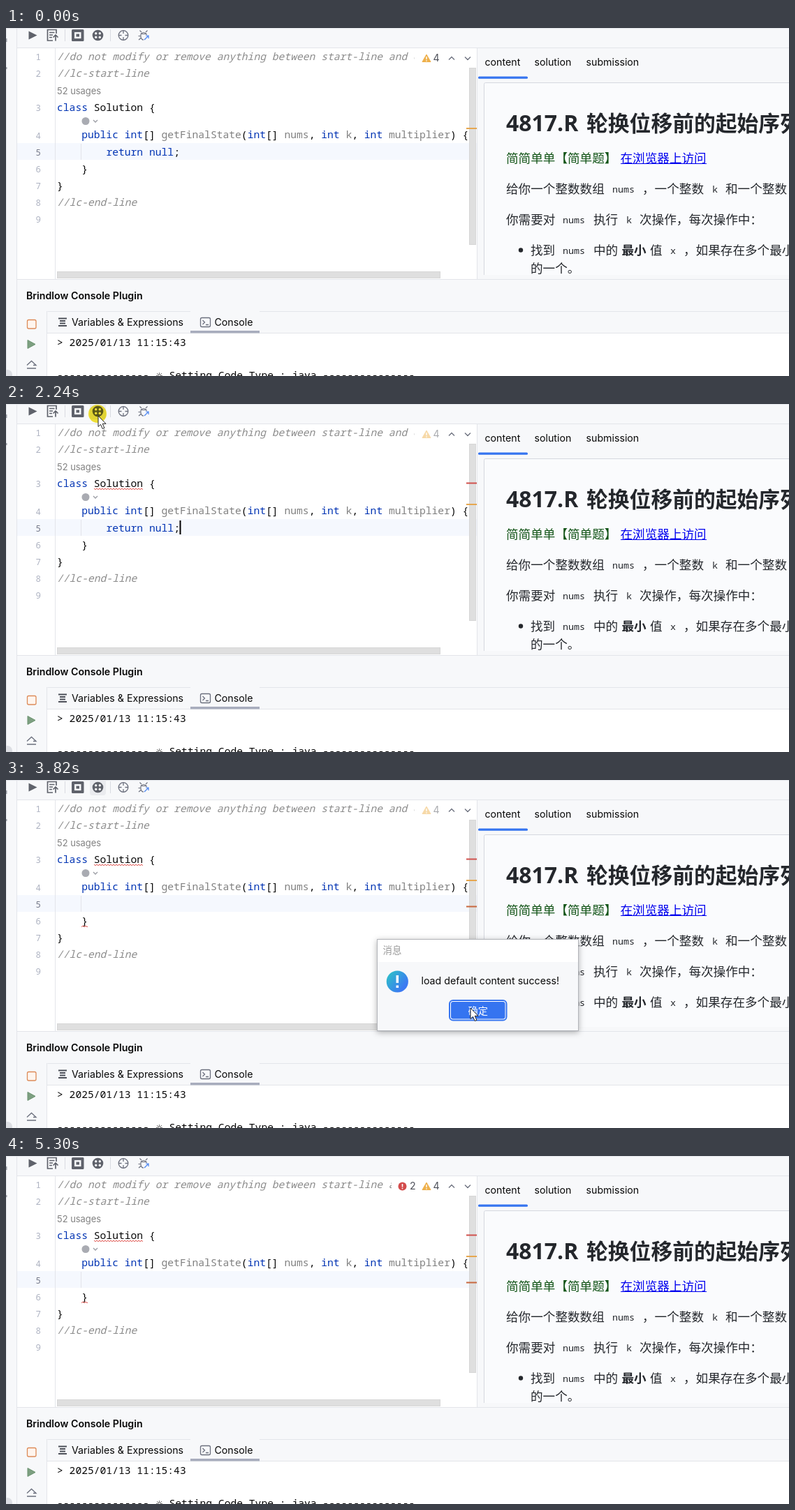
These frames come from a looping animation (1121 px wide and 499 px high, 5.37 s). An HTML page:

```html
<!DOCTYPE html>
<html lang="zh-CN">
<head>
<meta charset="utf-8">
<title>Editor</title>
<style>
html, body { margin: 0; width: 100%; height: 100%; overflow: hidden; background: #f7f8fa; }
svg { display: block; width: 1121px; height: 499px; }
text { white-space: pre; }
.ui { font: 14.2px Inter, sans-serif; fill: #080808; }
.mono { font: 14.67px "Noto Sans Mono", "DejaVu Sans Mono", monospace; fill: #080808; }
.num { font-size: 12.4px; fill: #aeb3c2; text-anchor: end; }
.comment { font-style: italic; fill: #8c8c8c; }
.kw { fill: #0033b3; }
.dim { fill: #808080; }
.doc { font: 17.6px "Noto Sans CJK SC", "Noto Sans CJK", sans-serif; fill: #24272c; }
.doc .v { font: 13.4px "Noto Sans Mono", monospace; }
.line { fill: none; stroke: #6c707e; stroke-width: 1.3; }
.edge { fill: none; stroke: #e3e5ea; }
.bar { fill: #dfdfdf; stroke: #d6d6d6; }

/* Every part shares one 5370 ms timeline. */
.t { animation: 5370ms step-end infinite; }
.cursor { animation-name: move; }
.pointer { animation-name: present; }
.hover { animation-name: hover; }
.tip { animation-name: tip; }
.click { fill: #f5e536; mix-blend-mode: multiply; }
.click1 { animation-name: click1; }
.click2 { animation-name: click2; }
.error1 { animation-name: error1; }
.error2 { animation-name: error2; }
.count { animation-name: count; }
.analysis { animation-name: analysis; }
.body { animation-name: body; }
.caret1 { animation-name: caret1; }
.caret2 { animation-name: caret2; }
.dialog { animation-name: dialog; transform-origin: 675.5px 293.5px; }
.active { animation-name: active; }
.inactive { animation-name: inactive; }

@keyframes move {
  0% { transform: translate(1057px, 485px); }
  3.72% { transform: translate(1057px, 485px); animation-timing-function: steps(4, start); }
  8.93% { transform: translate(457px, 245px); animation-timing-function: steps(4, start); }
  13.77% { transform: translate(73px, 94px); animation-timing-function: steps(5, start); }
  20.29% { transform: translate(142px, 23px); }
  21.6% { transform: translate(142px, 23px); animation-timing-function: steps(3, start); }
  25.13% { transform: translate(134px, 16px); }
  31.47% { transform: translate(132px, 17px); }
  46.74% { transform: translate(132px, 17px); animation-timing-function: steps(7, start); }
  55.86% { transform: translate(648px, 336px); animation-timing-function: steps(1, start); }
  57.16% { transform: translate(663px, 346px); animation-timing-function: steps(3, start); }
  61.07% { transform: translate(684px, 345px); animation-timing-function: steps(3, start); }
  64.98% { transform: translate(665px, 327px); }
  78.39% { transform: translate(665px, 327px); animation-timing-function: steps(4, start); }
  83.42%, 100% { transform: translate(918px, 485px); }
}
@keyframes present { 0%, 83.42%, 100% { opacity: 0; } 3.72% { opacity: 1; } }
@keyframes hover { 0%, 72.25%, 100% { opacity: 0; } 22.9% { opacity: 1; } }
@keyframes tip { 0%, 41.71%, 100% { opacity: 0; } 31.47% { opacity: .6; } 32.77% { opacity: 1; } }
@keyframes click1 { 0%, 43.01%, 100% { opacity: 0; } 41.71% { opacity: 1; } }
@keyframes click2 { 0%, 71.13%, 100% { opacity: 0; } 69.83% { opacity: 1; } }
@keyframes error1 { 0% { opacity: 0; } 6.33%, 100% { opacity: 1; } }
@keyframes error2 { 0% { opacity: 0; } 71.13%, 100% { opacity: 1; } }
@keyframes count { 0% { opacity: 0; } 81%, 100% { opacity: 1; } }
@keyframes analysis { 0%, 81%, 100% { opacity: 1; } 6.33% { opacity: .48; } }
@keyframes body { 0% { opacity: 1; } 46.74%, 100% { opacity: 0; } }
@keyframes caret1 { 0%, 46.74%, 100% { opacity: 0; } 41.71% { opacity: 1; } }
@keyframes caret2 { 0%, 82.12%, 98.69%, 100% { opacity: 0; } 73.37%, 90.87% { opacity: 1; } }
@keyframes dialog {
  0%, 74.67%, 100% { opacity: 0; transform: scale(.95); }
  51.95% { opacity: .35; transform: scale(.96); }
  53.25% { opacity: .75; transform: scale(.99); }
  54.56% { opacity: .95; transform: none; }
  55.86% { opacity: 1; transform: none; }
  72.25% { opacity: .55; transform: scale(.985); }
  73.37% { opacity: .14; transform: translate(-.5px, -1px) scale(.963); }
}
@keyframes active { 0% { opacity: 1; } 71.13%, 100% { opacity: 0; } }
@keyframes inactive { 0% { opacity: 0; } 71.13%, 100% { opacity: 1; } }
</style>
</head>
<body>
<svg viewBox="0 0 1121 499">
  <defs>
    <pattern id="wave" width="4" height="4" patternUnits="userSpaceOnUse">
      <path d="M-1 3.5L2 1L5 3.5" fill="none" stroke="#dc4a45"/>
    </pattern>
    <linearGradient id="info" x2="1" y2=".8">
      <stop offset=".1" stop-color="#2dbfca"/><stop offset=".85" stop-color="#3c7af2"/>
    </linearGradient>
    <filter id="shadow" x="-10%" y="-15%" width="120%" height="130%">
      <feDropShadow dx="0" dy="2" stdDeviation="4" flood-opacity=".3"/>
    </filter>
    <clipPath id="page"><rect x="685" y="80" width="436" height="274"/></clipPath>
  </defs>

  <!-- Window frame -->
  <rect width="1121" height="499" fill="#f7f8fa"/>
  <path class="edge" d="M0 .5H1121M15.5 0V499M15 28.5H1121M.5 0V499"/>
  <path d="M0 15v5M0 56v3" stroke="#9a9da6" stroke-width="3"/>
  <circle cx="2" cy="497" r="7" fill="#dcdee3"/>

  <!-- Toolbar -->
  <rect class="t hover" x="120" y="-3" width="23" height="25" rx="4" fill="#eaebef"/>
  <g fill="#5f626b">
    <path d="M32.5 4.5L44.5 10.5L32.5 16.5Z"/>
    <rect x="94" y="2" width="17.5" height="17" rx="1.5"/>
    <circle cx="131.5" cy="10.5" r="7.8"/>
  </g>
  <rect x="98" y="6" width="9.5" height="9" fill="#f7f8fa"/>
  <rect x="100.5" y="8.5" width="4.5" height="4" fill="#5f626b"/>
  <g fill="#f7f8fa">
    <circle cx="128.7" cy="7.7" r="1.7"/><circle cx="134.3" cy="7.7" r="1.7"/>
    <circle cx="128.7" cy="13.3" r="1.7"/><circle cx="134.3" cy="13.3" r="1.7"/>
  </g>
  <g class="line">
    <path d="M67 18H59.5V2.5H72V8M62 6.5H69.5M62 10H67M62 13.5H66M71 18.5V10.5M67.5 13.5L71 10L74.5 13.5" stroke="#5f626b" stroke-width="1.7"/>
    <circle cx="168" cy="10.5" r="6.8"/>
    <path d="M168 3.5V8M168 13V17.5M161 10.5H165.5M170.5 10.5H175"/>
    <path d="M193 8.5Q197 4.5 201 8.5M193 8.5V13Q194 17 197 17M193 8.5H201V10M194 6L191.5 3.5M200 6L202.5 3.5M193 11.5H189.5M193 14.5L190 17" stroke-width="1.1"/>
    <path d="M198 17L203.5 11.500M200 11H204V15" stroke="#4a84f0" stroke-width="1.2"/>
  </g>
  <path d="M84.5 2V19M149.5 2V19" stroke="#d9dbe1"/>

  <!-- Editor -->
  <rect x="16" y="29" width="658" height="331" fill="#fff"/>
  <rect x="16" y="165" width="658" height="24" fill="#f5f8fe"/>
  <path class="edge" d="M70.5 29V360M674.5 29V360M107.5 166V189"/>
  <g class="mono">
    <g>
      <text class="num" x="50" y="46">1</text>
      <text class="num" x="50" y="70">2</text>
      <text class="num" x="50" y="118.5">3</text>
      <text class="num" x="50" y="158.5">4</text>
      <text class="num" x="50" y="182.5" style="fill:#767a8a">5</text>
      <text class="num" x="50" y="206.5">6</text>
      <text class="num" x="50" y="231">7</text>
      <text class="num" x="50" y="255">8</text>
      <text class="num" x="50" y="279">9</text>
    </g>
    <text class="comment" x="73" y="46">//do not modify or remove anything between start-line and end</text>
    <text class="comment" x="73" y="70.3">//lc-start-line</text>
    <text x="73" y="118.5"><tspan class="kw">class</tspan> Solution {</text>
    <text x="108.2" y="158.3"><tspan class="kw">public int</tspan>[] <tspan class="dim">getFinalState</tspan>(<tspan class="kw">int</tspan>[] <tspan class="dim">nums</tspan>, <tspan class="kw">int</tspan> <tspan class="dim">k</tspan>, <tspan class="kw">int</tspan> <tspan class="dim">multiplier</tspan>) {</text>
    <text class="t body" x="143.4" y="182.5"><tspan class="kw">return null</tspan>;</text>
    <text x="108.2" y="206.5">}</text>
    <text x="73" y="231">}</text>
    <text class="comment" x="73" y="255">//lc-end-line</text>
  </g>
  <text class="ui" x="73" y="95" style="font-size:12.9px;fill:#808080">52 usages</text>
  <circle cx="114" cy="133.5" r="5.5" fill="#a9abb2"/>
  <path class="line" d="M125 132L128 135L131 132" style="stroke:#9a9ca3"/>
  <path class="t caret1" d="M249.5 167V187" stroke="#000" stroke-width="2"/>
  <path class="t caret2" d="M143.5 167V187" stroke="#000" stroke-width="2"/>

  <rect class="bar" x="663.5" y="57.5" width="9" height="253"/>
  <rect class="bar" x="73.5" y="349.5" width="548" height="9"/>
  <path d="M659 144H674" stroke="#e6a74f" stroke-width="2"/>
  <g class="t error1">
    <path d="M659 113.5H674" stroke="#d0504c" stroke-width="2"/>
    <rect x="126" y="120" width="70" height="4" fill="url(#wave)"/>
  </g>
  <g class="t error2">
    <path d="M659 181.5H674" stroke="#c8683f" stroke-width="2"/>
    <rect x="108" y="208" width="9" height="4" fill="url(#wave)"/>
  </g>

  <!-- Inspection summary -->
  <rect x="585" y="30" width="89" height="25" fill="#fff"/>
  <g class="t analysis">
    <path d="M602 38L608 48.5H596Z" fill="#eeb04b" stroke="#eeb04b" stroke-linejoin="round"/>
    <path d="M602 41V45M602 46.2V47.7" stroke="#fff" stroke-width="1.4"/>
    <text class="ui" x="611.5" y="48.3" style="fill:#4d5059">4</text>
  </g>
  <g class="t count">
    <rect x="552" y="30" width="38" height="25" fill="#fff"/>
    <circle cx="567.5" cy="43.5" r="6" fill="#d34b4b"/>
    <path d="M567.5 40V44.5M567.5 45.7V47.2" stroke="#fff" stroke-width="1.6"/>
    <text class="ui" x="578" y="48.3" style="fill:#4d5059">2</text>
  </g>
  <path class="line" d="M634 45.5L638 41.5L642 45.5M657 41.5L661 45.5L665 41.5"/>

  <!-- Description panel -->
  <g class="ui">
    <text x="685.5" y="54">content</text>
    <text x="756.5" y="54">solution</text>
    <text x="830.5" y="54">submission</text>
  </g>
  <rect x="676" y="69.5" width="71" height="3.2" rx="1.5" fill="#3574f0"/>
  <path d="M1121 78.5H686.5Q684.5 78.5 684.5 80.5V354H1121Z" fill="#fafbfd"/>
  <path d="M1121 78.5H686.5Q684.5 78.5 684.5 80.5V354" fill="none" stroke="#d5d8df"/>
  <g class="doc" clip-path="url(#page)">
    <text x="716" y="148" style="font:700 32px 'Open Sans','Noto Sans',sans-serif">4817.R</text>
    <text x="831" y="148" style="font-size:30.8px;font-weight:700">轮换位移前的起始序列</text>
    <text x="716" y="192.5" style="fill:#125417">简简单单【简单题】</text>
    <text x="879.5" y="192.5" style="fill:#00e">在浏览器上访问</text>
    <path d="M880 194.5H1003" stroke="#00e"/>
    <text x="716" y="237">给你一个整数数组</text>
    <text class="v" x="868" y="236">nums</text>
    <text x="911" y="237">，一个整数</text>
    <text class="v" x="1011" y="236">k</text>
    <text x="1030" y="237">和一个整数</text>
    <text x="716" y="281">你需要对</text>
    <text class="v" x="797" y="280">nums</text>
    <text x="841" y="281">执行</text>
    <text class="v" x="888" y="280">k</text>
    <text x="907" y="281">次操作，每次操作中：</text>
    <circle cx="737" cy="318.5" r="3.2"/>
    <text x="751" y="325">找到</text>
    <text class="v" x="797" y="324">nums</text>
    <text x="841" y="325">中的</text>
    <text x="881.5" y="325" style="font-weight:700">最小</text>
    <text x="922" y="325">值</text>
    <text class="v" x="951" y="324">x</text>
    <text x="970" y="325">，如果存在多个最小值</text>
    <text x="751" y="351">的一个。</text>
  </g>

  <!-- Console -->
  <path class="edge" d="M15 360.5H1121"/>
  <text class="ui" x="29" y="389" style="font-weight:600">Brindlow Console Plugin</text>
  <rect x="59" y="438" width="1062" height="61" fill="#fff"/>
  <path class="edge" d="M1121 406.5H363M264 406.5H59.5M58.5 406V499M59 437.5H1121"/>
  <rect x="264" y="434" width="99" height="3.5" fill="#a8adbd"/>
  <path class="line" d="M75 416.5H87M77 420H85M77 423.5H85M75 427H87" style="stroke:#4d5059;stroke-width:1.8"/>
  <rect class="line" x="278.5" y="415.5" width="14" height="13" rx="2"/>
  <path class="line" d="M281.5 419L284.5 422L281.5 425M286 425.5H290"/>
  <text class="ui" x="94" y="427">Variables &amp; Expressions</text>
  <text class="ui" x="298.5" y="427">Console</text>
  <rect x="30.5" y="418.5" width="12.5" height="12.5" rx="2" fill="#fff5ee" stroke="#dd8b59" stroke-width="1.3"/>
  <path d="M31 447.5L42 453.5L31 459.5Z" fill="#7d9f81" stroke="#6b9370"/>
  <path class="line" d="M30 483.5L36.5 477.5L43 483.5H39M30 488H43"/>
  <g class="mono">
    <text x="73" y="456">&gt; 2025/01/13 11:15:43</text>
    <text x="73" y="503">---------------</text>
    <text x="214" y="503" style="font:12px 'DejaVu Sans',sans-serif">☼</text>
    <text x="233.5" y="503">Setting Code Type : java ---------------</text>
  </g>

  <g class="t tip">
    <rect x="140.5" y="46.5" width="116" height="34" rx="4" fill="#fff" stroke="#d3d5db"/>
    <text class="ui" x="149" y="68" style="font-size:13.5px">default content</text>
  </g>

  <!-- Message box -->
  <g class="t dialog">
    <rect x="531.5" y="228.5" width="288" height="131" fill="#f7f8fa" stroke="#b3b5ba" filter="url(#shadow)"/>
    <rect x="532" y="229" width="287" height="32" fill="#fff"/>
    <g class="t active">
      <text class="doc" x="539.5" y="249" style="font-size:13.4px;fill:#111">消息</text>
      <path d="M795.5 238.5L806.5 249.5M806.5 238.5L795.5 249.5" stroke="#333" stroke-width="1.1"/>
    </g>
    <text class="doc t inactive" x="539.5" y="249" style="font-size:13.4px;fill:#999">消息</text>
    <circle cx="560.3" cy="289" r="15.6" fill="url(#info)"/>
    <path d="M560.3 280V291M560.3 294.5V298" stroke="#fff" stroke-width="3.5"/>
    <text class="ui" x="594.5" y="293">load default content success!</text>
    <rect x="635" y="316" width="81.5" height="28.5" rx="5" fill="#fff" stroke="#3574f0" stroke-width="2"/>
    <rect x="637" y="318" width="77.5" height="24.5" rx="3" fill="#3574f0"/>
    <text class="doc" x="661.5" y="335.5" style="font-size:14.2px;font-weight:500;fill:#fff">确定</text>
  </g>

  <!-- Pointer -->
  <circle class="t click click1" cx="131" cy="14" r="13"/>
  <circle class="t click click2" cx="664" cy="324" r="13"/>
  <g class="t pointer">
    <path class="t cursor" d="M0 0V15.5L3.5 12.3L6.2 18.5L8.9 17.3L6.2 11.3H11Z" fill="#fff" stroke="#222"/>
  </g>
</svg>
</body>
</html>
```
